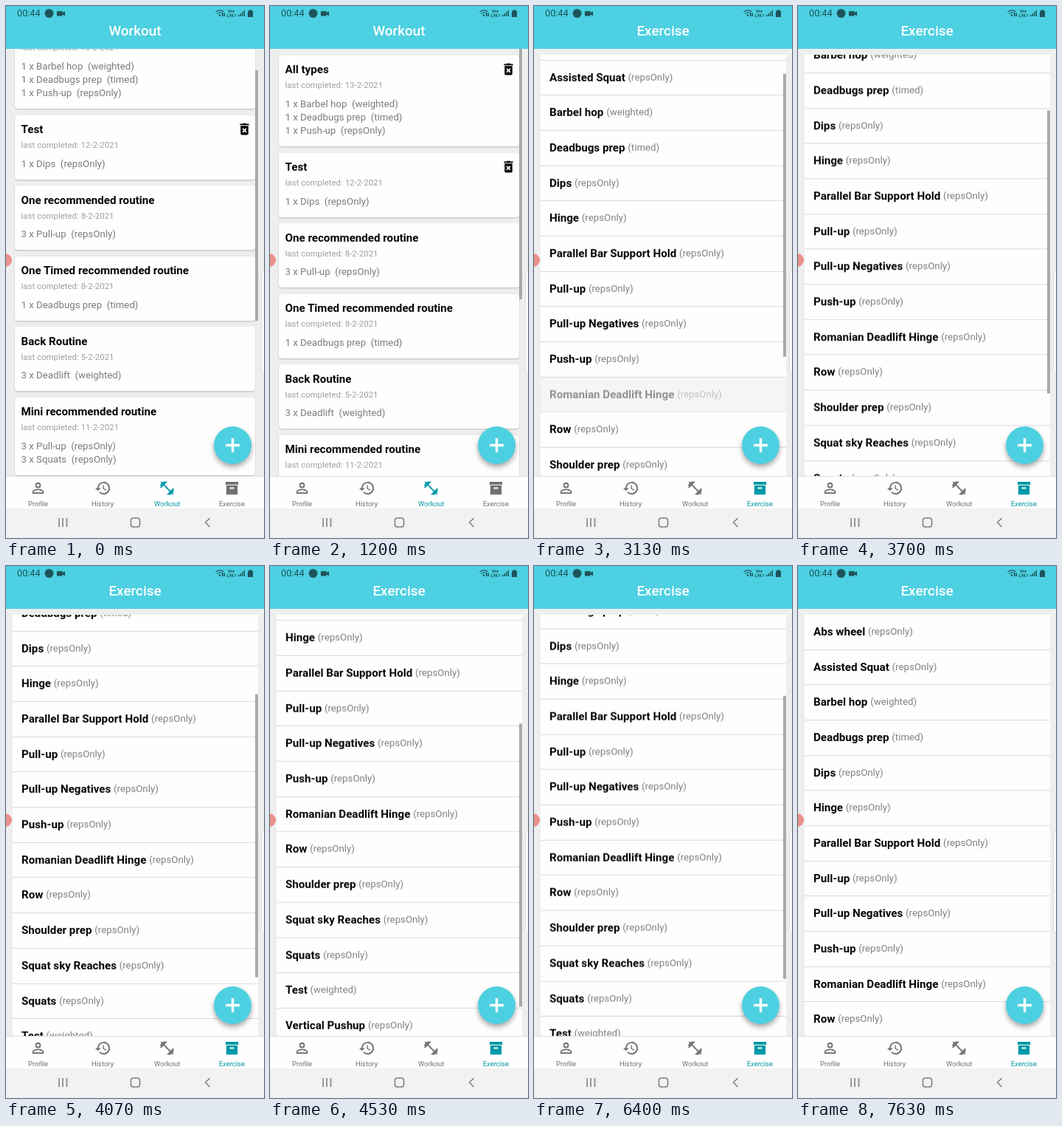
An HTML page that plays this animation: 350 px wide and 720 px high, repeating every 8000 ms.

```html
<!DOCTYPE html>
<html lang="en">
<head>
<meta charset="utf-8">
<title>Workout app</title>
<style>
  html, body { margin: 0; width: 100%; height: 100%; overflow: hidden; }
  #stage { position: relative; width: 350px; height: 720px; overflow: hidden; background: #eeeeee; font-family: Roboto, sans-serif; }
  #stage div, #stage svg { position: absolute; }
  .header { z-index: 2; top: 0; width: 350px; height: 58px; background: #4dd0e1; }
  .header .title { top: 22px; width: 350px; line-height: 24px; text-align: center; font-size: 18.9px; font-weight: 500; color: #fff; }
  .clock { left: 15px; top: 2px; font-size: 12.7px; line-height: 16px; color: #1f535a; }
  .page { inset: 0; }
  .clip { left: 0; width: 350px; overflow: hidden; }
  .list { top: 0; width: 350px; }
  .card { left: 12px; width: 326px; border-radius: 4px; background: #fefefe; box-shadow: 0 1px 2px #bbb; white-space: pre; }
  .card div { left: 8.5px; line-height: 20px; }
  .name { font-size: 15.15px; font-weight: 700; color: #050505; }
  .date { font-size: 11.45px; color: #a0a0a0; }
  .set { font-size: 13.25px; color: #7c7c7c; }
  .card svg { left: 300.5px; top: 8.5px; }
  .row { left: 9px; width: 333px; height: 46.68px; border-bottom: 1px solid #d9d9de; background: #fefefe; line-height: 47px; white-space: pre; text-indent: 12px; }
  .row small { position: relative; top: -1px; font-size: 13.25px; font-weight: 400; color: #808080; }
  .bar { left: 338px; top: 0; width: 3.5px; background: #a9a9a9; }
  .fab { left: 282px; top: 569px; width: 51px; height: 51px; border-radius: 50%; background: #4dd0e1; box-shadow: 0 4px 7px #0005; }
  .tabs { top: 637px; width: 350px; height: 43px; background: #fefefe; box-shadow: 0 -1px #dedede; }
  .tab { top: 0; width: 88px; height: 43px; color: #717171; fill: currentColor; }
  .tab svg { left: 32.5px; top: 4px; }
  .tab div { top: 30px; width: 88px; line-height: 13px; text-align: center; font-size: 9.45px; }
  .tab.active { color: #0097a7; }
  .system { top: 680px; width: 350px; height: 40px; background: #f2f2f2; }
  .bubble { left: -10px; top: 335px; width: 18px; height: 18px; border-radius: 50%; background: #e9918b; }
  .handle { left: 347px; top: 360px; width: 8px; height: 136px; border-radius: 4px; background: #fafafa; box-shadow: 0 0 0 1px #ddd; }
</style>
</head>
<body>
<div id="stage">
  <div class="page" id="workout"><div class="clip" style="top:58px;height:579px"><div class="list"></div><div class="bar" style="height:339px"></div></div></div>
  <div class="page" id="exercise"><div class="clip" style="top:66px;height:571px"><div class="list"></div><div class="bar" style="height:383px"></div></div></div>
  <div class="header">
    <div class="clock">00:44</div>
    <div class="title" id="workoutTitle">Workout</div>
    <div class="title" id="exerciseTitle">Exercise</div>
    <svg width="350" height="22" fill="#1f535a">
      <circle cx="58.5" cy="10" r="6"/>
      <path d="M69 7h7.5v2l3.5-2v6.5l-3.5-2v2h-7.5z"/>
      <path d="M284.500 8a8 8 0 0 1 11 0M286.500 10.300a5 5 0 0 1 7 0" fill="none" stroke="#1f535a" stroke-width="1.3"/>
      <circle cx="290" cy="12.500" r="1.300"/>
      <path d="M293 14V9.500h1.500V14zm2.500 0V9.500h1.500V14z"/>
      <g font-size="6" font-weight="700"><text x="301" y="8.500">VoI</text><text x="299.500" y="14.500">LTE1</text></g>
      <path d="M315 14v-2h1.500v2zm2.500 0v-4h1.500v4zm2.500 0V8h1.500v6zm2.500 0V6h1.500v8z"/>
      <path d="M328 6.500h2V5h3v1.500h2V15h-7z"/>
    </svg>
  </div>
  <div class="fab"><svg width="51" height="51" stroke="#fff" stroke-width="3.4"><path d="M16 25.500h19M25.500 16v19"/></svg></div>
  <div class="tabs"></div>
  <div class="system">
    <svg width="350" height="40" fill="none" stroke="#7d7d7d" stroke-width="1.5">
      <path d="M72 13v12M77 13v12M82.500 13v12M276.500 13l-6 6 6 6"/>
      <rect x="169.500" y="13" width="12" height="12" rx="3"/>
    </svg>
  </div>
  <div class="bubble"></div>
  <div class="handle"></div>
</div>
<script>
const LOOP = 8000, SWITCH = 2000, PITCH = 47.68;
const $ = selector => document.querySelector(selector);

const icons = {
  trash: 'M6 19a2 2 0 0 0 2 2h8a2 2 0 0 0 2-2V7H6zM8.460 11.880l1.410-1.410L12 12.590l2.120-2.120 1.410 1.410L13.410 14l2.120 2.120-1.410 1.410L12 15.410l-2.120 2.120-1.410-1.410L10.590 14zM15.500 4l-1-1h-5l-1 1H5v2h14V4z',
  Profile: 'M12 4a4 4 0 0 1 0 8 4 4 0 0 1 0-8m0 2a2 2 0 0 0 0 4 2 2 0 0 0 0-4m0 7c2.670 0 8 1.330 8 4v3H4v-3c0-2.670 5.330-4 8-4m0 1.900c-2.970 0-6.100 1.460-6.100 2.100v1.100h12.200V17c0-.640-3.130-2.100-6.100-2.100z',
  History: 'M13.500 8H12v5l4.280 2.540.720-1.210-3.500-2.080zM13 3a9 9 0 0 0-9 9H1l3.960 4.030L9 12H6a7 7 0 1 1 2.060 4.940l-1.420 1.420A9 9 0 1 0 13 3',
  Workout: 'M20.570 14.860L22 13.430 20.570 12 17 15.570 8.430 7 12 3.430 10.570 2 9.140 3.430 7.710 2 5.570 4.140 4.140 2.710 2.710 4.140l1.430 1.430L2 7.710l1.430 1.430L2 10.570 3.430 12 7 8.430 15.570 17 12 20.570 13.430 22l1.430-1.430L16.290 22l2.140-2.140 1.430 1.430 1.430-1.430-1.430-1.430L22 16.290z',
  Exercise: 'M3 3h18v4H3zM4 8h16v13H4zm5.500 3a.5.5 0 0 0-.5.5V13h6v-1.500a.5.5 0 0 0-.5-.5z'
};
const icon = (name, size) =>
  `<svg width="${size}" height="${size}" viewBox="0 0 24 24" fill-rule="evenodd"><path d="${icons[name]}"/></svg>`;

const routines = [
  ['All types', '13-2-2021', '1 x Barbel hop  (weighted)', '1 x Deadbugs prep  (timed)', '1 x Push-up  (repsOnly)'],
  ['Test', '12-2-2021', '1 x Dips  (repsOnly)'],
  ['One recommended routine', '8-2-2021', '3 x Pull-up  (repsOnly)'],
  ['One Timed recommended routine', '8-2-2021', '1 x Deadbugs prep  (timed)'],
  ['Back Routine', '5-2-2021', '3 x Deadlift  (weighted)'],
  ['Mini recommended routine', '11-2-2021', '3 x Pull-up  (repsOnly)', '3 x Squats  (repsOnly)']
];
let cardTop = 8.75;
$('#workout .list').innerHTML = routines.map(([name, date, ...sets], i) => {
  const height = 68.75 + 18.25 * sets.length;
  const lines = sets.map((set, n) => `<div class="set" style="top:${56 + 18.25 * n}px">${set}</div>`).join('');
  const html = `<div class="card" style="top:${cardTop}px;height:${height}px">
    <div class="name" style="top:9.5px">${name}</div>
    <div class="date" style="top:30.5px">last completed: ${date}</div>${lines}${i < 2 ? icon('trash', 21) : ''}</div>`;
  cardTop += height + 8.5;
  return html;
}).join('');

const exercises = ['Abs wheel', 'Assisted Squat', 'Barbel hop', 'Deadbugs prep', 'Dips', 'Hinge',
  'Parallel Bar Support Hold', 'Pull-up', 'Pull-up Negatives', 'Push-up', 'Romanian Deadlift Hinge', 'Row',
  'Shoulder prep', 'Squat sky Reaches', 'Squats', 'Test', 'Vertical Pushup', 'Vertical Rows', 'Wrist Prep'];
const kinds = { 'Barbel hop': 'weighted', 'Deadbugs prep': 'timed', Test: 'weighted' };
$('#exercise .list').innerHTML = exercises.map((name, i) =>
  `<div class="row name" style="top:${i * PITCH}px">${name} <small>(${kinds[name] || 'repsOnly'})</small></div>`).join('');

const tab = (name, i, state = '') =>
  `<div class="tab ${state}" id="${name}${state}" style="left:${87.6 * i - 0.5}px">${icon(name, 23)}<div>${name}</div></div>`;
$('.tabs').innerHTML = tab('Profile', 0) + tab('History', 1) + tab('Workout', 2) + tab('Exercise', 3)
  + tab('Workout', 2, 'active') + tab('Exercise', 3, 'active');

// Steps are [ms, value, easing to the next step].
const play = (el, prop, steps, format = String) => el.animate(
  steps.map(([ms, value, easing = 'linear']) => ({ offset: ms / LOOP, [prop]: format(value), easing })),
  { duration: LOOP, iterations: Infinity });
const fade = (el, steps) => play(el, 'opacity', steps);
const scrollPage = (page, steps, ratio) => {
  play($(page + ' .list'), 'transform', steps, y => `translateY(${-y}px)`);
  play($(page + ' .bar'), 'transform', steps, y => `translateY(${y * ratio}px)`);
};
const show = (id, first) => fade($('#' + id),
  [[0, +first], [SWITCH, +first], [SWITCH, +!first], [LOOP, +!first]]);

['workout', 'workoutTitle', 'Workoutactive', 'Exercise'].forEach(id => show(id, true));
['exercise', 'exerciseTitle', 'Exerciseactive', 'Workout'].forEach(id => show(id, false));

scrollPage('#workout', [[0, 51, 'ease-out'], [830, 0], [LOOP, 0]], 0.57);
scrollPage('#exercise', [[0, 0], [2900, 0, 'ease-in'], [3130, 40], [4070, 168], [4530, 230], [5050, 330, 'ease-out'],
  [5130, 334], [5880, 334, 'ease-in'], [6000, 319.5], [6800, 24, 'ease-out'], [6950, 0], [LOOP, 0]], 0.64);

fade($('#workout .bar'), [[0, 1], [1250, 1], [1500, 0], [LOOP, 0]]);
fade($('#exercise .bar'), [[0, 0], [2900, 0], [2900, 1], [5430, 1], [5680, 0], [5880, 0], [5880, 1],
  [7250, 1], [7500, 0], [LOOP, 0]]);

const rows = document.querySelectorAll('.row');
fade(rows[10], [[0, 1], [2820, 1], [2970, 0.2], [3070, 0.2], [3320, 1], [LOOP, 1]]);
fade(rows[14], [[0, 1], [5780, 1], [5930, 0.2], [6000, 0.2], [6250, 1], [LOOP, 1]]);
</script>
</body>
</html>
```
